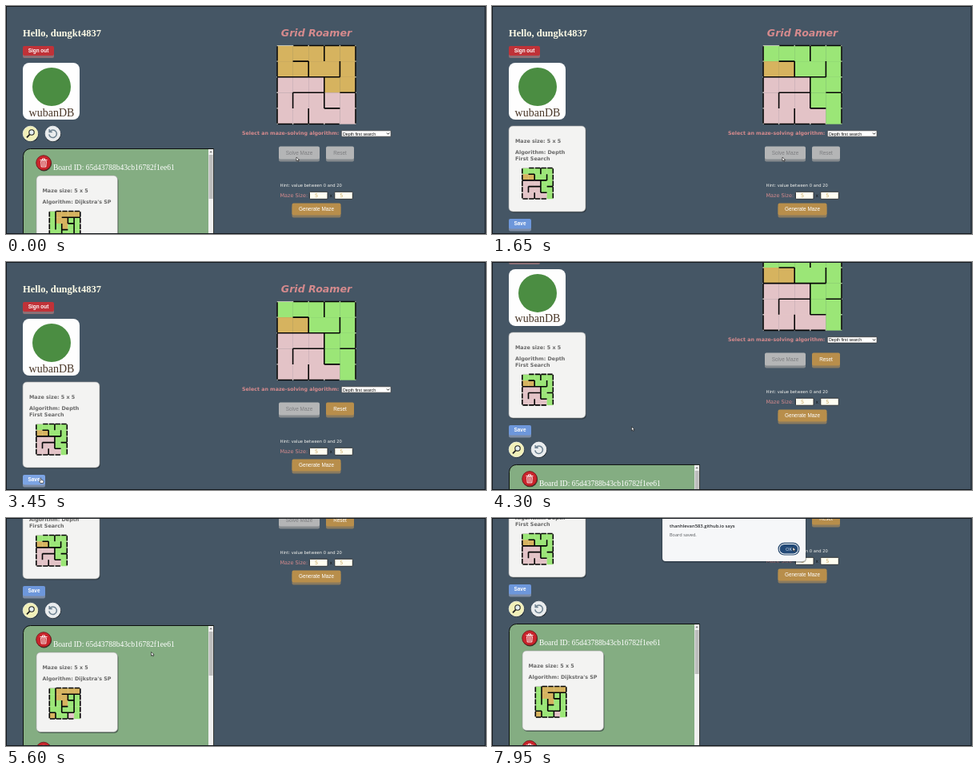
An HTML page that plays this animation: 600 px wide and 285 px high, repeating every 8000 ms.

```html
<!DOCTYPE html>
<html lang="en">
<head>
<meta charset="utf-8">
<title>Grid Roamer</title>
<style>
  html, body { margin: 0; width: 100%; height: 100%; overflow: hidden; background: #455665; }
  svg { display: block; width: 100vw; height: 100vh; }
  text { white-space: pre; }
  .verdana { font-family: "DejaVu Sans", sans-serif; }
  .arial { font-family: "Liberation Sans", sans-serif; }
  .times { font-family: "Liberation Serif", serif; }
  .dialog { font-family: "Open Sans", sans-serif; }
  .bold { font-weight: 700; }
  .middle { text-anchor: middle; }
</style>
</head>
<body>
<svg id="stage" viewBox="0 0 600 285"></svg>
<script>
const LOOP = 8000;
const GREEN = '#9be677', YELLOW = '#d6b35f', PINK = '#e3c3c7', ROSE = '#d58a8d';
const GOLD = '#b88e4b', GRAY = '#b4b5b6', CARD = '#f3f3f2', INK = '#686868';

// Wall strings hold, row by row, the columns with a wall on that side of the cell.
const solvedMaze = {
  right: ['2', '13', '2', '02', '1'],
  bottom: ['1', '0123', '124', '3'],
  colors: ['ggggg', 'yyggg', 'pppgg', 'pppgg', 'ppppg']
};
const boardMaze = {
  right: ['0', '023', '013', '13', '02'],
  bottom: ['234', '3', '2', '023'],
  colors: ['gyyyy', 'gyygg', 'ggygg', 'ggggg', 'yggpg']
};
const path = ['00', '01', '02', '12', '13', '03', '04', '14', '24', '23', '33', '34', '44'];
const palette = { g: GREEN, y: YELLOW, p: PINK };

const rect = (x, y, w, h, fill, r = 0, extra = '') =>
  `<rect x="${x}" y="${y}" width="${w}" height="${h}" rx="${r}" fill="${fill}" ${extra}/>`;
const circle = (x, y, r, fill, extra = '') =>
  `<circle cx="${x}" cy="${y}" r="${r}" fill="${fill}" ${extra}/>`;
const line = (d, color, width, extra = '') =>
  `<path d="${d}" fill="none" stroke="${color}" stroke-width="${width}" ${extra}/>`;
const text = (x, y, size, fill, cls, str, extra = '') =>
  `<text x="${x}" y="${y}" font-size="${size}" fill="${fill}" class="${cls}" ${extra}>${str}</text>`;

function button(x, y, w, h, fill, shade, label, ink, cls = '', id = '') {
  return `<g id="${id}">` + rect(x, y + 3, w, h, shade, 2) +
    rect(x, y, w, h, fill, 2, 'class="face"') +
    text(x + w / 2, y + h / 2 + 2.2, 6.4, ink, 'arial middle ' + cls, label) + '</g>';
}

function maze(x, y, size, { right, bottom, colors }, id = '') {
  const c = size / 5, gap = .7;
  let cells = '', inner = '', outer = '';
  for (let r = 0; r < 5; r++) {
    for (let k = 0; k < 5; k++) {
      cells += rect(x + k * c, y + r * c, c + .2, c + .2, palette[colors[r][k]], 0,
        id && `id="${id}${r}${k}"`);
    }
    for (const k of right[r]) inner += `M${x + (+k + 1) * c} ${y + r * c}v${c}`;
    for (const k of bottom[r] || '') inner += `M${x + k * c} ${y + (r + 1) * c}h${c}`;
    const a = r * c + gap, len = c - 2 * gap;
    outer += `M${x} ${y + a}v${len}M${x + size} ${y + a}v${len}`;
    if (r > 0) outer += `M${x + a} ${y}h${len}`;
    if (r < 4) outer += `M${x + a} ${y + size}h${len}`;
  }
  const rim = `M${x + size} ${y}H${x}V${y + size}H${x + size - c}M${x + size} ${y}v${size}`;
  return cells + line(rim, '#c9cabf', .9) + line(inner + outer, '#050505', 1.6);
}

const card = (x, y, w, h) =>
  rect(x + 1, y + 1.5, w, h, '#22282e', 5, 'opacity=".55"') +
  rect(x, y, w, h, CARD, 5, 'stroke="#9a9c9c" stroke-width=".6"');

const trash = y =>
  circle(47.5, y + .8, 9.6, '#2d3a2f') +
  circle(47, y, 9.3, '#c9252c', 'stroke="#6e1519" stroke-width=".8"') +
  line(`M42.5 ${y - 3.5}h9M45.5 ${y - 3.7}v-1.4h3v1.4M43.6 ${y - 2}l.6 7h5.6l.6-7zM46 ${y - 1}v5M48 ${y - 1}v5`, '#fff', .9);

const input = x =>
  rect(x, 232.3, 22.5, 9, '#fffef2', 1, 'stroke="#25282b" stroke-width=".9"') +
  text(x + 6.5, 239.1, 6.4, '#c6a45e', 'verdana', '5');

const header =
  text(21, 38, 12.5, '#fdfbe6', 'times bold', 'Hello, dungkt4837') +
  button(21, 50, 39, 12, '#c03238', '#8c7076', 'Sign out', '#fff', 'bold') +
  rect(21, 71, 71, 71, '#fefefe', 8) +
  circle(57, 101, 24, '#4b8d42') +
  text(57, 137.5, 14, '#4a3728', 'times middle', 'wubanDB');

const controls =
  text(388, 38, 12.6, ROSE, 'verdana bold middle', 'Grid Roamer', 'font-style="italic"') +
  maze(339, 49.5, 98, solvedMaze, 'cell') +
  text(295, 161, 6.3, ROSE, 'verdana bold', 'Select an maze-solving algorithm:') +
  rect(419.3, 155.8, 61.8, 7.4, '#fff', .8, 'stroke="#333" stroke-width=".7"') +
  text(421, 161.5, 5.25, '#111', 'arial', 'Depth first search') +
  line('M476 158.6l1.6 1.7 1.6-1.7', '#111', .9) +
  button(341, 175.5, 51, 16, GRAY, '#858a8e', 'Solve Maze', '#7d7e80') +
  button(400, 175.5, 35, 16, GRAY, '#858a8e', 'Reset', '#7d7e80', '', 'reset') +
  text(342.5, 226, 5.23, '#f4f4f0', 'verdana', 'Hint: value between 0 and 20') +
  text(342.5, 239.2, 6.5, ROSE, 'verdana', 'Maze Size:') +
  input(379.5) + text(404.4, 239, 6, '#15181b', 'verdana', 'x') + input(410.8) +
  button(357.5, 246.5, 61, 15, GOLD, '#8a7a5e', 'Generate Maze', '#fff');

const saved = `<g id="saved">` + card(21, 150, 96, 107) +
  text(29, 171, 6.4, INK, 'verdana bold', 'Maze size: 5 x 5') +
  text(29, 185, 6.4, INK, 'verdana bold', 'Algorithm: Depth') +
  text(29, 192.6, 6.4, INK, 'verdana bold', 'First Search') +
  maze(37.8, 202.5, 38.5, solvedMaze) +
  button(21, 266, 28, 12.5, '#6d97db', '#7c8ba4', 'Save', '#fff', 'bold', 'save') + '</g>';

// Drawn relative to the top edge of the board list.
const boards = `<g id="boards">` +
  circle(31, -17.8, 9.8, '#252d33') + circle(30.5, -18.5, 9.3, '#f1f0b9', 'stroke="#fbfbe4" stroke-width=".8"') +
  circle(32, -20, 3.2, '#e4eef0', 'stroke="#222" stroke-width="1.1"') + line('M29.6-17.4l-3.6 3.8', '#222', 1.8) +
  circle(59, -17.8, 9.8, '#252d33') + circle(58.5, -18.5, 9.3, '#e9ecee', 'stroke="#fff" stroke-width=".8"') +
  line('M54.8-21.2a4.8 4.8 0 1 1-1 3.6M54.2-24v3.4h3.6', '#6e8291', 1.5) +
  `<path d="M21.5 160V9.5a9 9 0 0 1 9-9H259.5V160Z" fill="#84ad82" stroke="#0c0f0c"/>` +
  rect(253, 1, 6.2, 160, '#f0f0f0') + rect(253.6, 8, 5, 55, '#bdbdbd') +
  `<path d="M254.4 5.3h3.4l-1.7-2.2z" fill="#777"/>` +
  trash(18) +
  text(59, 27, 9.53, '#fff', 'times', 'Board ID: 65d43788b43cb16782f1ee61') +
  card(38, 34, 101.5, 99.5) +
  text(45.5, 54.7, 6.4, INK, 'verdana bold', 'Maze size: 5 x 5') +
  text(45.5, 68.7, 6.4, INK, 'verdana bold', "Algorithm: Dijkstra's SP") +
  maze(54.3, 78.5, 38.5, boardMaze) + trash(155.5) + '</g>';

const dialog = `<g id="dialog">` +
  rect(212, -8, 181, 64, '#1c242b', 5, 'opacity=".35"') + rect(213, -8, 179, 62, '#f6f7f9', 4) +
  text(222, 11.5, 5.8, '#26282b', 'dialog', 'thanhlevan583.github.io says', 'font-weight="600"') +
  text(222, 23, 5.6, '#55585c', 'dialog', 'Board saved.') +
  rect(357.5, 30.8, 27, 15.8, '#27496f', 7.9) + rect(358.7, 32, 24.6, 13.4, '#fff', 6.7) +
  rect(359.6, 32.9, 22.8, 11.6, '#234a78', 5.8) +
  text(371, 40.8, 5.8, '#dbe7f5', 'dialog middle', 'OK') + '</g>';

const cursor = `<g id="cursor" stroke="#111" stroke-width=".6" fill="#fff">` +
  `<path id="arrow" d="M0 0v4.8l1.2-1 .8 1.7.9-.4-.8-1.7h1.6z"/>` +
  `<path id="hand" d="M-.7 0q.7-.8 1.3 0v1.9l2.5.7q.7.5.3 2L2.9 6H-.5L-2 3.6q.3-.7 1.3 0z"/></g>`;

document.getElementById('stage').innerHTML =
  rect(0, 0, 600, 285, '#455665') +
  `<g id="page">${header}${controls}${saved}${boards}</g>` + dialog + cursor +
  rect(.5, .5, 598.5, 284, 'none', 0, 'stroke="#14191e"');

const $ = id => document.getElementById(id);
const face = id => $(id).querySelector('.face');
const show = (id, on) => $(id).setAttribute('visibility', on ? 'visible' : 'hidden');
const paint = (el, fill) => el.setAttribute('fill', fill);

const scrollKeys = [[0, 0], [3950, 0], [4300, 62], [4650, 94], [4850, 94], [5000, 105], [5600, 181], [5750, 183]];
const cursorKeys = [[0, 363, 189], [1800, 363, 189], [2550, 62, 266], [2800, 62, 266], [3450, 43.5, 270.5],
  [3850, 43.5, 270.5], [4200, 174.5, 206], [4400, 174.5, 206], [4650, 120, 190], [4850, 110, 188],
  [5000, 90.5, 184], [5600, 181.5, 167.5], [5900, 181.5, 167.5], [6700, 38, 89], [7150, 38, 89],
  [7450, 270, 58], [7600, 285, 55], [7950, 376, 36.5]];

function at(keys, t) {
  const i = keys.findIndex(key => key[0] > t);
  if (i < 0) return keys[keys.length - 1].slice(1);
  const [t0, ...a] = keys[i - 1], [t1, ...b] = keys[i];
  const u = (t - t0) / (t1 - t0);
  return a.map((v, k) => v + (b[k] - v) * u);
}

function drawSearch(t) {
  const step = Math.floor((t + 50) / 100);
  path.forEach((cell, i) => {
    const visited = step >= i - 9;
    const traced = step >= 16 - i;
    paint($('cell' + cell), traced ? GREEN : visited ? YELLOW : PINK);
  });
}

function render(t) {
  drawSearch(t);
  const solved = t >= 1600, enabled = t >= 1750;
  show('saved', solved);
  $('boards').setAttribute('transform', `translate(0 ${solved ? 315 : 178})`);

  const [resetBase, resetFace] = $('reset').querySelectorAll('rect');
  paint(resetBase, enabled ? '#8a7a5e' : '#858a8e');
  paint(resetFace, enabled ? GOLD : GRAY);
  paint($('reset').querySelector('text'), enabled ? '#fff' : '#7d7e80');

  const overSave = t > 3000 && t < 3900 || t > 6650 && t < 7150;
  paint(face('save'), overSave ? '#7ca4e4' : '#6d97db');
  $('page').setAttribute('transform', `translate(0 ${-at(scrollKeys, t)[0]})`);
  show('dialog', t >= 7100);

  $('cursor').setAttribute('transform', `translate(${at(cursorKeys, t).join(' ')})`);
  show('hand', overSave);
  show('arrow', !overSave);
}

const start = performance.now();
function frame() {
  render((performance.now() - start) % LOOP);
  requestAnimationFrame(frame);
}
frame();
</script>
</body>
</html>
```
